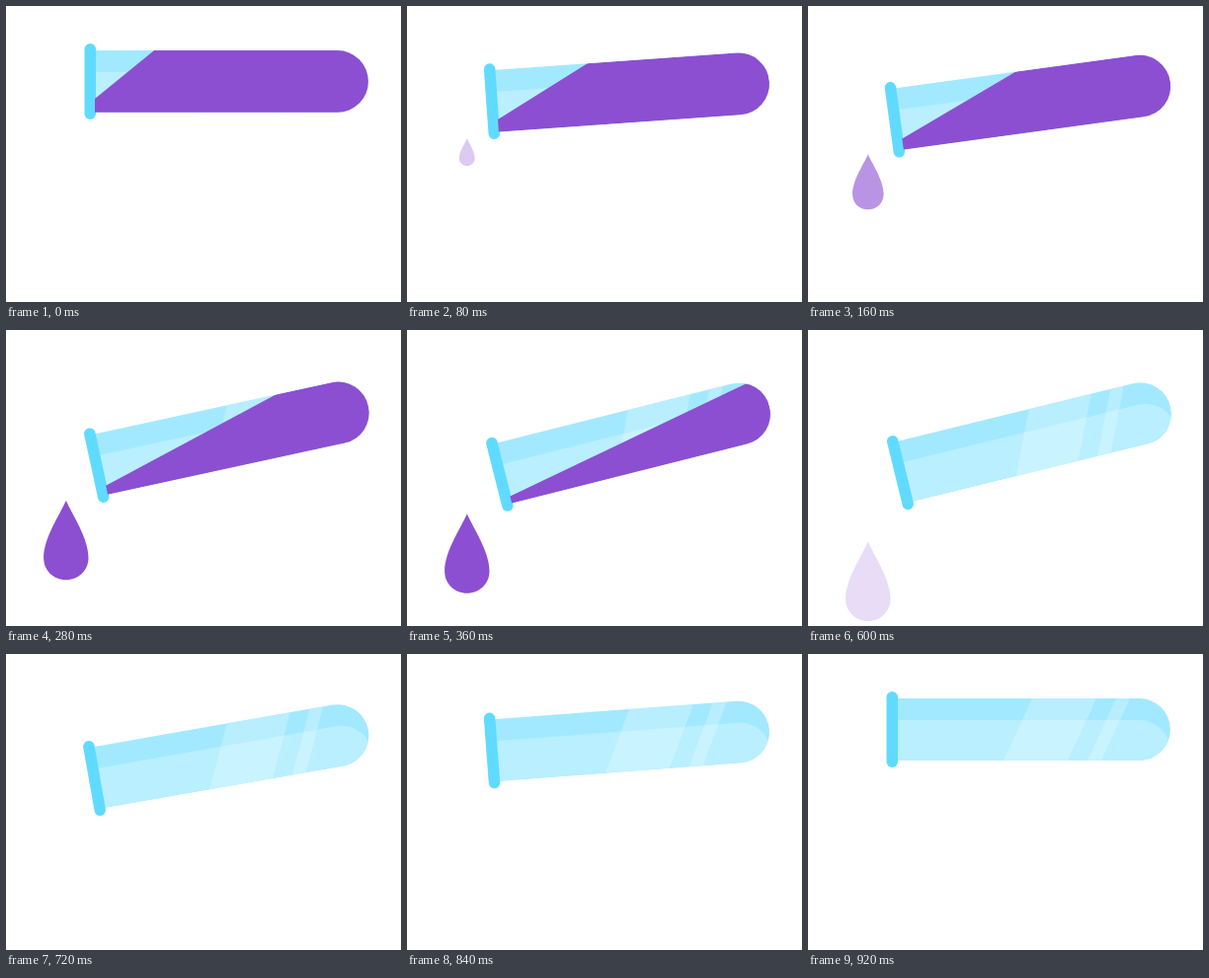
An HTML page for the animation above (1 s loop, 400 px wide and 300 px high).

```html
<!DOCTYPE html>
<html lang="en">
<head>
<meta charset="utf-8">
<title>Pouring test tube</title>
<style>
  html, body { margin: 0; width: 100%; height: 100%; overflow: hidden; background: #fff; }
  svg { display: block; width: 100vw; height: 100vh; }
</style>
</head>
<body>
<svg viewBox="0 0 400 300">
  <defs>
    <path id="body" d="M85 45H335.5a31.4 31.4 0 0 1 0 62.8H85Z"/>
    <clipPath id="inside"><use href="#body"/></clipPath>
  </defs>
  <path id="drop" fill="#8c4fd2" d="M0 0C6 14 22.7 38 22.7 58C22.7 71 12.5 80.5 0 80.5S-22.7 71 -22.7 58C-22.7 38 -6 14 0 0Z"/>
  <g id="tube">
    <use href="#body" fill="#a2e9ff"/>
    <g clip-path="url(#inside)">
      <use href="#body" y="22" fill="#b9efff"/>
      <path fill="#fff" fill-opacity=".23" d="M227 45H292L263 108H198ZM312 45H326L297 108H283Z"/>
    </g>
    <rect x="79.5" y="38" width="11.5" height="77" rx="5.75" fill="#60dbff"/>
    <g clip-path="url(#inside)"><path id="liquid" fill="#8c4fd2"/></g>
  </g>
</svg>
<script>
  const LOOP = 1000, STEP = 40;
  const PEAK = 460, TURN = 488, REST = 920, TILT = 15;
  const EMPTY = 560, FALL = 600;
  const get = id => document.getElementById(id);
  const tube = get('tube'), liquid = get('liquid'), drop = get('drop');

  // Swing up, pause, swing back.
  function tilt(t) {
    if (t < PEAK) return TILT * Math.sin(Math.PI / 2 * t / PEAK);
    if (t < TURN) return TILT;
    return TILT * Math.cos(Math.PI / 2 * (t - TURN) / (REST - TURN));
  }

  // The surface is a line from the mouth to the closed end of the tube.
  function surface(t) {
    const mouth = 94 + .0155 * t + 9 * (t / 520) ** 6;
    const end = 108 - .316 * (EMPTY - t) - 63 * Math.exp(-t / 40);
    return `M90 ${mouth}L367 ${end}V120H90Z`;
  }

  function draw(t) {
    tube.setAttribute('transform', `rotate(${-tilt(t)} 371 76.5)`);
    liquid.setAttribute('d', t <= EMPTY ? surface(t) : '');

    const y = 214.5 - 97.5 * Math.max(0, 1 - t / FALL) ** 1.35;
    const size = Math.min(1, t / 230);
    const alpha = Math.max(0, Math.min(1, t / 265, (FALL + STEP - t) / 200));
    drop.setAttribute('transform', `translate(60.8 ${y}) scale(${size})`);
    drop.setAttribute('opacity', alpha);
  }

  function tick() {
    const t = performance.now() % LOOP;
    draw(Math.min(REST, Math.floor(t / STEP) * STEP));
    requestAnimationFrame(tick);
  }
  tick();
</script>
</body>
</html>
```
